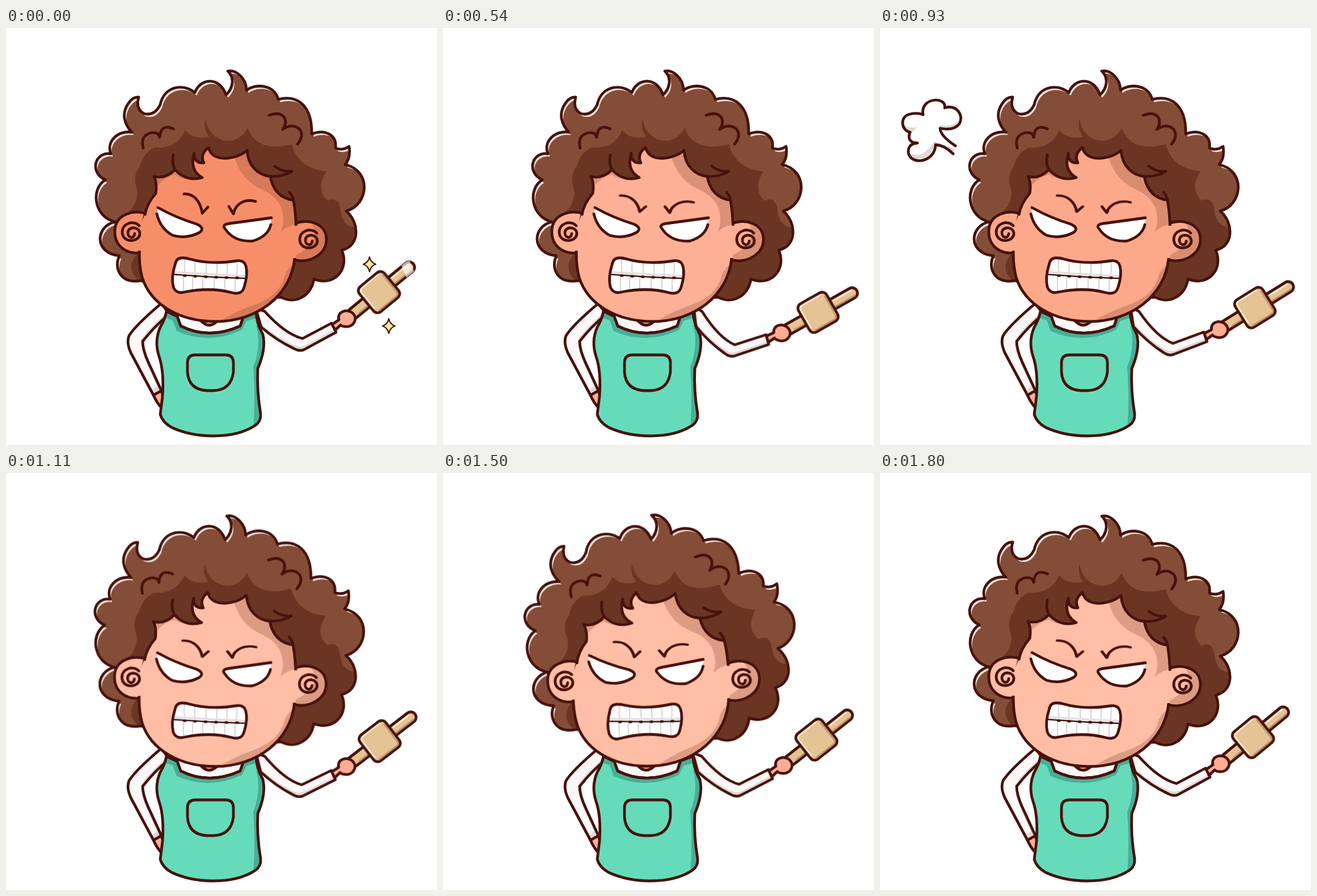
Recreate the animation shown at these times as an HTML page. Size 760 by 736 pixels, loop 1830 ms.

```html
<!DOCTYPE html>
<html lang="en">
<head>
<meta charset="utf-8">
<title>Angry cook</title>
<style>
html, body { margin: 0; width: 100%; height: 100%; overflow: hidden; background: #fff; }
svg { display: block; width: 760px; height: 736px; }
.ink { stroke: #47120c; stroke-width: 4.8; stroke-linecap: round; stroke-linejoin: round; }
.line { fill: none; }
.white { fill: #fdf8f8; }
.grey { fill: #dfd9d9; }
.hair { fill: #844d38; }
.dark { fill: #6b3523; }
.hand { fill: #fdad94; }
.apron { fill: #66dbba; }
.fold { fill: #49ae96; }
.wood { fill: #e6c394; }
.shade { fill: #8a4a35; opacity: .3; }

.skin, #head, #arm, #gloss, .star, #puff, .brow { animation: 1830ms linear infinite; }
.skin { fill: #ffbea5; animation-name: flush; }
#head { transform-origin: 354px 494px; animation-name: rock; animation-timing-function: ease-in-out; }
#arm { transform-origin: 455px 505px; animation-name: swing; animation-timing-function: ease-in-out; }
#gloss { animation-name: sweep; }
.star { fill: #ffec96; stroke-width: 2.2; transform-box: fill-box; transform-origin: center; }
#star1 { animation-name: twinkle1; }
#star2 { animation-name: twinkle2; }
#puff { transform-origin: 135px 215px; animation-name: puff; }
.brow { transform-box: fill-box; transform-origin: center; animation-name: frown; }

@keyframes flush {
  0% { fill: #f68f69; }
  13.1%, 22% { fill: #ffba9e; }
  29.5% { fill: #fdb095; }
  40% { fill: #f68f69; }
  50.8% { fill: #fca98b; }
  59%, 100% { fill: #ffbea5; }
}
@keyframes rock {
  0%, 59.6% { transform: rotate(0deg); }
  68.4%, 68.9% { transform: rotate(-7.7deg); }
  77% { transform: rotate(0deg); }
  82% { transform: rotate(-3.2deg); }
  88.2%, 89% { transform: rotate(-7.8deg); }
  98.2%, 100% { transform: rotate(0deg); }
}
@keyframes swing {
  0%, 19.7% { transform: rotate(0deg); animation-timing-function: ease-in; }
  29.5% { transform: rotate(9.8deg); animation-timing-function: ease-out; }
  33.5% { transform: rotate(16.5deg); }
  45.9% { transform: rotate(0deg); animation-timing-function: ease-in; }
  50.8% { transform: rotate(7.4deg); animation-timing-function: ease-out; }
  55.7% { transform: rotate(16.5deg); }
  62.3% { transform: rotate(0deg); }
  68.9% { transform: rotate(16.5deg); }
  81% { transform: rotate(0deg); }
  82% { transform: rotate(1.2deg); }
  90.2% { transform: rotate(16.5deg); }
  98.2%, 100% { transform: rotate(0deg); }
}
@keyframes sweep {
  0% { transform: translateX(84px); }
  26%, 100% { transform: translateX(-84px); }
}
@keyframes twinkle1 {
  0%, 2% { transform: scale(1); }
  10%, 100% { transform: scale(0); }
}
@keyframes twinkle2 {
  0%, 14% { transform: scale(1); }
  22%, 100% { transform: scale(0); }
}
@keyframes puff {
  0%, 1.6% { transform: translate(60px, 40px) scale(.2); opacity: 0; }
  1.7% { transform: translate(60px, 40px) scale(.3); opacity: 1; }
  6% { transform: translate(53px, -37px) scale(1.9); }
  11.4% { transform: none; opacity: 1; }
  12.4% { transform: scale(.7); opacity: 0; }
  41.2% { transform: translate(60px, 40px) scale(.2); opacity: 0; }
  41.3% { transform: translate(60px, 40px) scale(.3); opacity: 1; }
  45.6% { transform: translate(53px, -37px) scale(1.9); }
  50.6%, 51.2% { transform: none; opacity: 1; }
  53%, 100% { transform: scale(.7); opacity: 0; }
}
@keyframes frown {
  0%, 15% { transform: none; }
  25%, 100% { transform: scale(1.07, .84); }
}
</style>
</head>
<body>
<svg viewBox="0 0 760 736">
<defs>
  <path id="mop" d="M234 122 C220 121 206 142 209 160 Q212 174 222 184 C198 180 176 200 185 222 C157 218 146 254 175 268
    C148 285 156 334 192 342 C158 350 154 397 200 402 C190 422 200 452 238 446 L370 480 L485 475
    C510 489 538 473 543 443 C576 457 607 428 592 392 C623 386 625 345 600 323 C639 313 646 252 598 241
    Q608 230 605 209 Q593 217 581 212 C584 188 562 178 539 187 C540 137 514 117 480 126
    C474 100 440 97 424 110 C424 88 405 73 391 76 C404 88 400 107 388 118 C376 84 342 89 333 114
    C308 95 278 106 272 135 Q262 156 243 151 Q228 143 234 122 Z"/>
  <path id="face" d="M264 292 Q267 274 261 262 Q281 267 298 250 Q318 272 346 264 Q323 251 332 221 Q331 239 349 238
    Q341 223 357 211 Q362 230 386 230 Q410 229 425 216 C427 245 446 260 466 262 Q473 299 507 304
    Q515 350 509 406 C503 473 442 518 370 518 C306 518 255 488 240 440 C232 410 234 370 245 330 Q248 310 264 292 Z"/>
  <path id="sleeve" d="M440 494 L456 500 Q493 541 523 548 L574 521 L582 537 L525 568 Q517 571 508 566 Q478 552 450 528 Z"/>
  <path id="bentArm" d="M274 486 Q229 524 217 543 Q212 555 220 573 L260 648 L274 640 L251 590 Q241 568 241 553 Q262 526 288 505 Z"/>
  <path id="bib" d="M283 500 Q280 515 272 528 Q261 553 270 580 Q279 606 276 650 L272 682 Q276 696 292 705 Q325 720 365 720
    Q412 720 440 701 Q450 694 449 681 Q442 640 444 601 Q459 566 453 541 Q441 520 441 500 L419 508 L413 526
    Q358 551 308 526 L302 509 Z"/>
  <path id="cloud" d="M129 222 Q114 207 98 206 C97 238 54 243 50 220 Q49 204 66 203 C54 203 48 196 53 184
    C36 180 35 155 53 152 Q66 149 76 153 C70 122 118 120 114 141 C133 134 149 153 140 169 Q130 182 106 177 Q106 190 133 208"/>
  <path id="spiral" d="M235 349 C225 338 204 345 205 361 C206 380 235 379 236 363 C236 351 217 349 215 360 C214 371 226 373 227 363"/>
  <path id="star" d="M0 -13 Q2 -3 11 0 Q2 3 0 13 Q-2 3 -11 0 Q-2 -3 0 -13 Z"/>
  <path id="mouth" d="M308 406 Q300 407 298 418 Q291 440 295 457 Q300 470 315 466 Q360 457 398 467 Q416 472 420 457
    Q427 435 423 420 Q420 409 406 411 Q360 418 325 408 Q315 405 308 406 Z"/>
  <path id="leftEye" d="M268 317 Q300 335 336 346 Q352 353 341 361 Q318 373 294 366 Q272 354 266 328"/>
  <path id="rightEye" d="M468 335 L394 345 Q380 347 386 354 Q402 378 435 376 Q462 368 467 347"/>
  <clipPath id="inMop"><use href="#mop"/></clipPath>
  <clipPath id="inFace"><use href="#face"/></clipPath>
  <clipPath id="inSleeve"><use href="#sleeve"/></clipPath>
  <clipPath id="inBent"><use href="#bentArm"/></clipPath>
  <clipPath id="inBib"><use href="#bib"/></clipPath>
  <clipPath id="inCloud"><use href="#cloud"/></clipPath>
  <clipPath id="inMouth"><use href="#mouth"/></clipPath>
  <clipPath id="inPin" transform="translate(601 513) rotate(-39.5)">
    <rect x="4" y="-11" width="150" height="22" rx="11"/>
    <rect x="43" y="-30" width="61" height="61" rx="10"/>
  </clipPath>
</defs>

<g id="puff">
  <use href="#cloud" fill="#fff"/>
  <path class="grey" clip-path="url(#inCloud)" d="M49 218 Q72 236 96 200 L133 214 L128 224 L98 214 L90 240 L45 240 Z
    M143 158 Q130 177 104 171 L112 185 L148 175 Z M38 168 Q52 180 66 174 L55 186 Z"/>
  <use href="#cloud" class="ink line"/>
</g>

<g id="arm">
  <g transform="translate(601 513) rotate(-39.5)">
    <rect class="ink wood" x="4" y="-9.5" width="148" height="19" rx="9.5"/>
    <path d="M22 6 H145" stroke="#bd986b" stroke-width="3"/>
    <path d="M108 -5 H143" stroke="#fff3df" stroke-width="2.5" stroke-linecap="round"/>
    <rect class="ink wood" x="45" y="-28.5" width="57" height="57" rx="9"/>
    <path class="line" d="M52 25 H92 Q98 25 98 18 V-20" stroke="#bd986b" stroke-width="3"/>
    <path class="line" d="M49 17 V-18 Q49 -25 56 -25 H92" stroke="#fff5e4" stroke-width="2.5" stroke-linecap="round"/>
  </g>
  <g clip-path="url(#inPin)">
    <path id="gloss" fill="#fff" opacity=".65" d="M601 390 L619 390 L674 520 L656 520 Z M629 390 L640 390 L695 520 L684 520 Z"/>
  </g>
  <path class="ink hand" d="M574 524 L587 515 C583 500 602 495 611 503 C622 513 612 529 599 527 Q592 527 590 524 L581 533 Z"/>
  <use href="#sleeve" class="white"/>
  <path class="grey" clip-path="url(#inSleeve)" d="M450 523 Q490 555 516 562 Q522 563 528 560 L580 531 L586 540 L520 575 L450 540 Z"/>
  <use href="#sleeve" class="ink line"/>
</g>
<use href="#star" id="star1" class="ink star" x="641" y="417"/>
<use href="#star" id="star2" class="ink star" x="675" y="526"/>

<path class="ink hand" d="M260 648 L274 640 L284 674 L275 671 Q266 662 260 648 Z"/>
<use href="#bentArm" class="white"/>
<path class="grey" clip-path="url(#inBent)" d="M276 640 L251 590 Q241 568 241 553 L288 505 L282 503 Q244 538 238 551 Q237 566 247 590 L266 632 L256 641 L262 650 Z"/>
<use href="#bentArm" class="ink line"/>

<path class="ink white" d="M283 500 L302 509 L308 526 Q358 551 413 526 L419 508 L441 500 Z"/>
<path class="ink hand" d="M344 517 Q358 532 373 517 Z"/>
<use href="#bib" class="apron"/>
<g clip-path="url(#inBib)" class="fold">
  <path d="M278 498 L302 505 L308 526 Q358 551 413 526 L419 505 L445 500 L441 512 L424 517 L416 533 Q358 560 301 535 L294 516 L279 511 Z"/>
  <path d="M441 525 Q451 560 436 598 Q440 650 436 710 L460 700 V525 Z"/>
</g>
<use href="#bib" class="ink line"/>
<path class="ink line" d="M334 577 H387 Q401 577 401 591 V607 Q397 639 366 640 H354 Q322 638 320 607 V591 Q320 577 334 577 Z"/>

<g id="head">
  <g clip-path="url(#inMop)">
    <use href="#mop" fill="#eadfdb"/>
    <use href="#mop" class="hair" x="3.5" y="5"/>
    <path class="dark" d="M204 333 Q235 316 231 284 Q222 262 236 244 Q242 220 262 211 Q302 214 316 180 Q330 198 358 192 Q347 178 352 160
      C358 205 410 212 426 176 Q442 221 504 205 Q515 248 565 253 Q545 284 567 305 Q588 296 590 324 Q594 351 617 352
      L610 382 L606 440 L540 490 L470 490 L480 330 L250 335 Z M245 455 Q200 425 240 390 Z"/>
  </g>
  <use href="#mop" class="ink line"/>
  <path class="ink line" d="M242 212 Q236 190 256 185 Q269 183 271 193 Q273 168 295 178 M464 154 Q483 147 491 158 Q496 168 488 179 Q505 167 518 179 Q526 191 514 205"/>

  <path class="ink skin" d="M248 328 C226 320 194 328 192 356 C190 386 214 401 240 396"/>
  <path class="ink skin" d="M508 346 C530 335 565 344 565 373 C565 400 535 416 508 409"/>
  <use href="#face" class="skin"/>
  <g clip-path="url(#inFace)" class="shade">
    <path d="M402 224 Q412 264 445 282 Q484 298 488 328 Q491 346 484 360 Q498 347 520 345 V230 L425 205 Z
      M520 408 Q497 422 492 435 Q484 474 432 491 Q405 500 372 520 H520 Z
      M258 260 L264 282 Q280 262 298 259 Q312 269 335 266 L320 240 Z"/>
  </g>
  <use href="#face" class="ink line"/>
  <!-- open the seams between ears and cheeks -->
  <path class="skin" d="M244 331 H254 V393 H231 Q230 360 244 331 Z M501 349 H518 V406 H501 Z"/>
  <path class="shade" d="M540 345 Q556 378 511 401 L511 407 C535 413 563 398 563 373 Q562 353 540 345 Z"/>
  <path class="ink line" d="M298 250 Q292 240 295 224 M466 262 Q488 263 504 253 M474 244 Q486 254 504 253 M507 304 Q506 297 500 290"/>
  <use href="#spiral" class="ink line"/>
  <use href="#spiral" class="ink line" x="313" y="13"/>

  <path class="ink line brow" d="M314 293 C330 292 343 305 346 327 L356 316"/>
  <path class="ink line brow" d="M440 306 C422 301 405 309 401 328 L393 315"/>
  <g class="ink" fill="#fff">
    <use href="#leftEye"/>
    <use href="#rightEye"/>
  </g>

  <use href="#mouth" fill="#fff"/>
  <g clip-path="url(#inMouth)" class="line" stroke="#d4d2d5" stroke-width="2">
    <path d="M316 406 Q313 420 316 433 M334 408 Q332 422 334 434 M353 410 V436 M372 412 V437 M390 410 V438 M407 408 Q409 424 406 439
      M313 440 V468 M329 440 V468 M347 440 V466 M367 442 V466 M386 443 V468 M404 443 V470"/>
    <path stroke-width="4" stroke="#e2e0e2" d="M297 431 Q360 435 424 438"/>
  </g>
  <path class="ink line" style="stroke-width:2.4" d="M296 435 Q360 440 423 442"/>
  <path class="ink line" style="stroke-width:4.6" stroke-dasharray="2.5 16" d="M314 437 Q360 440 410 441"/>
  <use href="#mouth" class="ink line"/>
</g>
</svg>
</body>
</html>
```
